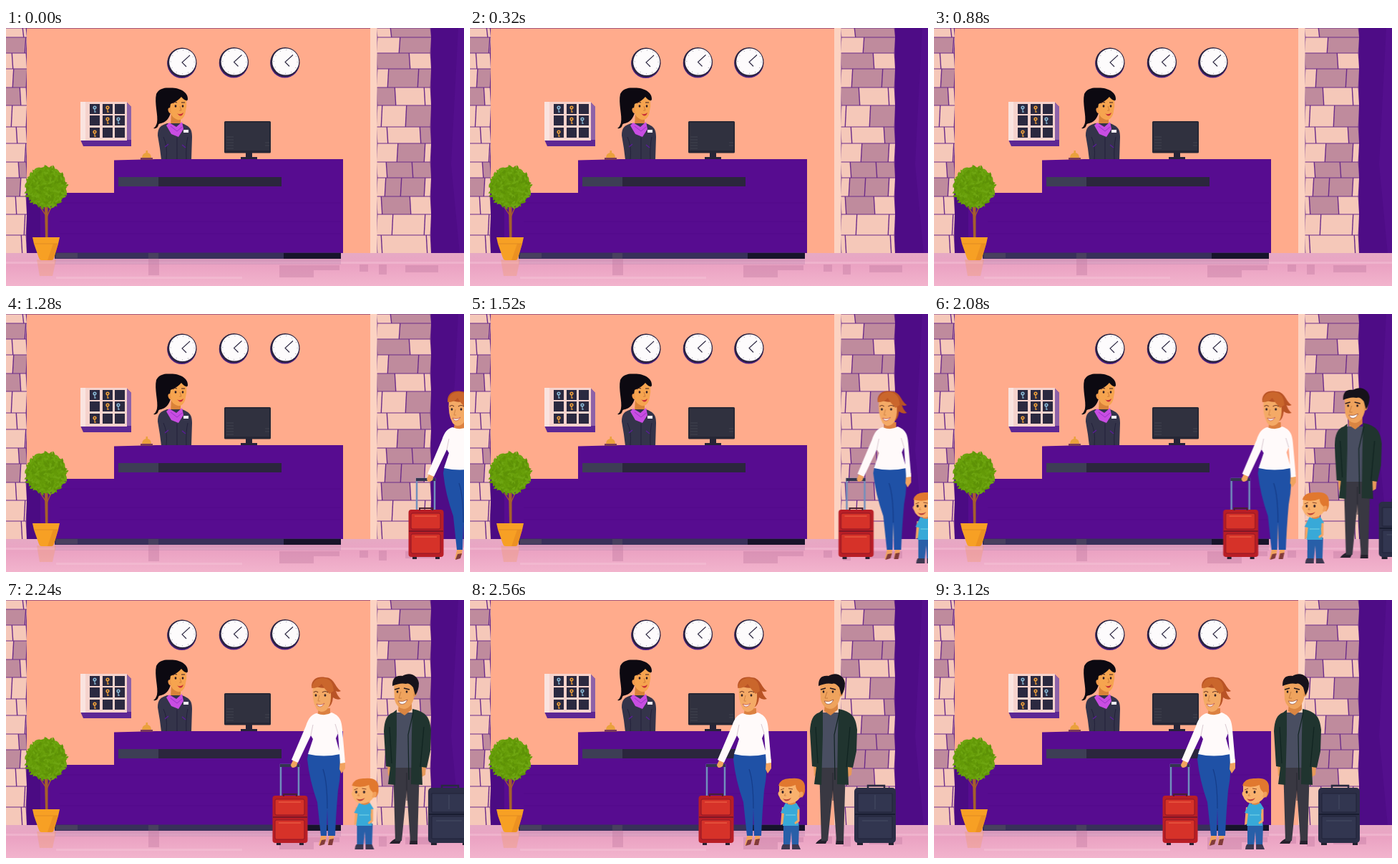
These frames come from a looping animation (640x360 px, 3.2 s). An HTML page:

```html
<!DOCTYPE html>
<html lang="en">
<head>
<meta charset="utf-8">
<title>Hotel reception</title>
<style>
html, body { margin: 0; width: 100%; height: 100%; overflow: hidden; background: #ffab8c; }
svg { display: block; width: 100vw; height: 100vh; }
.guest { animation: arrive 3200ms infinite; }
.child { animation-name: arrive-child; }
/* the guests glide in at twelve and a half pictures per second */
@keyframes arrive {
  0% { transform: translateX(340px); animation-timing-function: step-end; }
  27.5% { transform: translateX(322.2px); animation-timing-function: steps(20, end); }
  77.5% { transform: translateX(5.4px); animation-timing-function: step-end; }
  80%, 100% { transform: none; }
}
@keyframes arrive-child {
  0% { transform: translateX(340px); animation-timing-function: step-end; }
  27.5% { transform: translateX(304px); animation-timing-function: steps(12, end); }
  57.5% { transform: translateX(130.7px); animation-timing-function: steps(8, end); }
  77.5% { transform: translateX(5.4px); animation-timing-function: step-end; }
  80%, 100% { transform: none; }
}
</style>
</head>
<body>
<svg viewBox="0 0 640 360" preserveAspectRatio="none">
  <defs>
    <linearGradient id="floor" x1="0" y1="0" x2="0" y2="1">
      <stop offset="0" stop-color="#e6a9c4"/>
      <stop offset=".4" stop-color="#eba3c3"/>
      <stop offset="1" stop-color="#f2b4cd"/>
    </linearGradient>
    <g id="clock">
      <circle cx="-.3" cy="1.500" r="20.500" fill="#4b1f86"/>
      <circle r="20.500" fill="#2a2340"/>
      <circle cx=".7" cy="-.5" r="18.600" fill="#fdfbfc"/>
      <circle cx=".7" cy="-.5" r="16.500" fill="none" stroke="#8b8792" stroke-width="1.300" stroke-dasharray=".6 8.040"/>
      <path d="M11-10 0 0 6 6" fill="none" stroke="#29243e" stroke-width="1.100"/>
    </g>
    <g id="key">
      <circle r="1.800" cy="-2" fill="none" stroke="currentColor" stroke-width="1.600"/>
      <path d="M0 0V5M0 4H2" stroke="currentColor" stroke-width="1.200"/>
    </g>
  </defs>

  <rect width="640" height="360" fill="#ffab8c"/>
  <path d="M29 0H509V1H29Z" fill="#a85a80"/>
  <rect x="594" width="46" height="315" fill="#4e0c86"/>
  <path d="M640 0V315H634L622 190 632 0Z" fill="#540f8d"/>
  <rect width="29" height="315" fill="#6b2c8a"/>
  <rect x="509" width="85" height="315" fill="#6b2c8a"/>
  <g id="bricks"></g>
  <path d="M509 0H518.500V315H509Z" fill="#fcd3c2"/>

  <use href="#clock" x="246" y="48"/>
  <use href="#clock" x="318.500" y="47.500"/>
  <use href="#clock" x="390" y="47.500"/>

  <!-- key cabinet -->
  <path d="M104 156H169V104L175 110V165H108Z" fill="#5d2794"/>
  <path d="M169 104 175 110V156H169Z" fill="#8d62a8"/>
  <rect x="104" y="103" width="65" height="54" fill="#f6d3cd"/>
  <path d="M104 103H111V157H104Z" fill="#fae3df"/>
  <path id="slots" fill="#2b2940"/>
  <g color="#f2a23b"><use href="#key" x="142" y="113"/><use href="#key" x="142" y="129"/><use href="#key" x="124" y="147"/></g>
  <g color="#8bbbd8"><use href="#key" x="124" y="113"/><use href="#key" x="157" y="129"/></g>

  <!-- receptionist -->
  <path d="M229 83.500C242 83 255 89 254 100C252 103 246 103 243 104L231 113C230 120 228 126 223 130C218 134 215 132 213 135Q212 141 206 140Q210 137 211 132C213 122 207 105 210 92C214 84 222 83 229 83.500Z" fill="#0c0911"/>
  <path d="M231 118H244V134L239 141 230 135Z" fill="#d98239"/>
  <path d="M230 106C237 103 242 100 245 96Q249 101 252 101Q253 109 251 116C250 125 245 129 240 128C233 126 229 120 229 112Z" fill="#f6a44f"/>
  <path d="M230 112C226 109 225 116 229 119L231 119" fill="#f0994b"/>
  <path d="M233 105Q236 102 239 104M245 104 250 104" fill="none" stroke="#391c20" stroke-width="1"/>
  <ellipse cx="237" cy="109" rx="1.400" ry="1.700" fill="#2e1a21"/>
  <ellipse cx="247" cy="109" rx="1.300" ry="1.700" fill="#2e1a21"/>
  <path d="M243 109 245 115 242 115" fill="none" stroke="#cf7c3a" stroke-width="1"/>
  <path d="M239 119Q243 122 248 118Q246 124 242 122Z" fill="#c72d36"/>
  <path d="M225 133C216 136 212 139 212 150L215 168 217 184H259L260 152C260 140 256 137 246 133Z" fill="#34344a"/>
  <path d="M228 132 238 138 246 131 248 141 241 152 231 148 224 136Z" fill="#c84de2"/>
  <path d="M230 137 239 144 246 138" fill="none" stroke="#9a34c4" stroke-width="1"/>
  <path d="M220 152Q226 165 224 183M254 152Q251 165 252 183M239 153V183" fill="none" stroke="#23213a" stroke-width="1"/>
  <path d="M222 166 227 162M246 163 251 167" stroke="#5a1d98" stroke-width="1.500"/>
  <rect x="248" y="142" width="7" height="4" fill="#f5f0f7"/>

  <!-- monitor -->
  <path d="M335 174H344V180H351V183H328V180H335Z" fill="#262437"/>
  <rect x="305" y="130" width="65" height="44.500" rx="1.500" fill="#262735"/>
  <path d="M307 132H368V171H307Z" fill="#30313f"/>
  <path d="M308 152H318M308 156H318M308 160H318M308 164H318M308 168H318M362 160H368M362 164H368" stroke="#41424f" stroke-width="1"/>

  <!-- floor and counter -->
  <rect y="314" width="640" height="46" fill="url(#floor)"/>
  <path d="M0 326H640V329H0ZM70 347H330V350H70Z" fill="#f7ccdc" opacity=".35"/>
  <path d="M68 322H468V330H68Z" fill="#bf86b0" opacity=".4"/>
  <path d="M199 322H214V345H199ZM382 331H430V348H382ZM430 331H466V338H430ZM494 330H506V340H494ZM521 330H532V344H521ZM558 331H604V341H558Z" fill="#b9749c" opacity=".35"/>
  <path d="M43 323H70L65 346H47Z" fill="#f09a6a" opacity=".35"/>
  <path d="M29 230H151V184.500L210 183H471V314H29Z" fill="#570c90"/>
  <path d="M29 230H48V314H29Z" fill="#4b0b83"/>
  <path d="M75 244H468M75 270H468M75 287H468" stroke="#520a8a" stroke-width=".8"/>
  <path d="M68 313.500H468V322H68Z" fill="#38305a"/>
  <path d="M70 314H100V321H70ZM199 314H213V322H199Z" fill="#48405f"/>
  <path d="M388 314H468V322H388Z" fill="#17142b"/>
  <path d="M157 208H385V221H157Z" fill="#2b263d"/>
  <path d="M157 208H213V221H157Z" fill="#3d3e55"/>
  <path d="M190 182Q190 175 195.500 174V171H198V174Q203 175 203 182Z" fill="#eaa13d"/>
  <path d="M188 181H205V184H188Z" fill="#7b3a59"/>

  <!-- plant -->
  <path d="M54 250 55 293H58.500V250Z" fill="#a5602b"/>
  <path d="M56 266 63 250M56 262 48 250" stroke="#a5602b" stroke-width="1.300"/>
  <g id="leaves"></g>
  <path d="M37 292H75L73 301 67 321Q66 324 63 324H50Q47 324 46 321L39 301Z" fill="#f7a024"/>
  <path d="M66 301H73L67 321Q66 324 63 324H58Z" fill="#e5871f" opacity=".6"/>
  <path d="M39 301H73" stroke="#e08a22" stroke-width="1"/>

  <!-- woman with red case -->
  <g class="guest">
    <path d="M331 273V230H356V273" fill="none" stroke="#718fbd" stroke-width="2.500"/>
    <path d="M330 229H357V233H330Z" fill="#33364f"/>
    <path d="M325 337H331V342H325ZM357 337H363V342H357Z" fill="#272132"/>
    <rect x="319.500" y="273" width="49" height="66" rx="4" fill="#b91e26"/>
    <path d="M335 274V271H353V274" fill="none" stroke="#4b2030" stroke-width="2"/>
    <rect x="323" y="278" width="41" height="22" rx="2" fill="#d63229" stroke="#8e1725"/>
    <rect x="323" y="307" width="41" height="27" rx="2" fill="#d63229" stroke="#8e1725"/>
    <path d="M320 303H368" stroke="#7f1726" stroke-width="2"/>
    <path d="M328 282H359M328 311H359" stroke="#f26a4b" stroke-width="1.200"/>

    <path d="M384 151H400V164H382Z" fill="#dc8141"/>
    <path d="M388 325H395L394 336 388 342H384Q386 335 388 325ZM399 324H406L405 333 402 342H397Z" fill="#f1a35f"/>
    <path d="M388 335 394 334 392 341 385 343ZM399 334 405 333 403 342H397Z" fill="#823b3a"/>
    <path d="M370 210H413Q417 234 411 266Q408 300 407 329H397L396 291 395 329H387L382 282Q371 251 368 222Z" fill="#1f51a6"/>
    <path d="M390 236Q396 253 396 291" fill="none" stroke="#163d89" stroke-width="1.200"/>
    <path d="M349 222 355 225 353 232Q346 237 345 230ZM414 223 421 222V235L416 242 413 236Z" fill="#f1a35f"/>
    <path d="M381 158C374 160 370 164 366 176L346 223 355 227 373 189 376 194 369 215Q391 220 414 215L408 193 411 186 414 228 421 227 417 181C416 166 412 161 402 157Q393 163 381 158Z" fill="#fffafa"/>
    <path d="M373 189 376 174M411 186 407 173" fill="none" stroke="#d9c8d0" stroke-width="1"/>
    <path d="M374 121C374 110 383 106 393 108C406 108 406 121 415 127Q411 129 408 127Q410 134 415 138Q409 140 404 136Q403 147 397 150L397 134Z" fill="#b95325"/>
    <path d="M376 119Q391 126 400 120Q404 146 394 154Q387 159 381 152Q374 140 376 119Z" fill="#f4aa66"/>
    <path d="M374 123Q377 107 393 109Q404 111 405 127L399 131Q392 124 388 117Q384 123 374 123Z" fill="#ca662c"/>
    <path d="M377 129Q380 126 383 129M389 129Q393 126 397 129" fill="none" stroke="#693423" stroke-width="1.100"/>
    <ellipse cx="380" cy="133" rx="1.400" ry="1.800" fill="#312127"/>
    <ellipse cx="393" cy="133" rx="1.400" ry="1.800" fill="#312127"/>
    <path d="M385 133 383 141H386" fill="none" stroke="#d18446" stroke-width="1"/>
    <path d="M381 145Q387 148 392 144Q388 151 383 148Z" fill="#fff" stroke="#b8423f" stroke-width=".7"/>
  </g>

  <!-- man with dark case -->
  <g class="guest">
    <path d="M556 263V259H579V263" fill="none" stroke="#292b40" stroke-width="2.500"/>
    <path d="M541 337H549V342H541ZM585 337H592V342H585Z" fill="#22212f"/>
    <rect x="537" y="262" width="58" height="77" rx="5" fill="#2b2e46"/>
    <path d="M542 270H590V296H542ZM542 302H590V333H542Z" fill="#323650" stroke="#202338"/>
    <path d="M538 299H594" stroke="#191d31" stroke-width="1.800"/>
    <path d="M566 272V292M548 308H584" stroke="#464c65"/>

    <path d="M493 332 500 334 497 340H483Q485 336 493 332ZM512 332 522 334V341H511Z" fill="#26212d"/>
    <path d="M488 232H525L522 336H512L507 265 500 336H491Z" fill="#393842"/>
    <path d="M507 241V280" stroke="#282630"/>
    <path d="M480 230H486L485 242 481 246ZM527 232H534L533 244 528 247Z" fill="#e79a59"/>
    <path d="M488 157H520V234H488Z" fill="#494e61"/>
    <path d="M493 153 488 157C479 160 476 168 475 183L478 232 484 233 481 257 491 258 493 187ZM515 152C533 156 539 162 541 181L540 211 535 234 528 233 529 258 513 257 514 188Z" fill="#20342f"/>
    <path d="M483 177 486 228M531 177 526 233M516 157 509 188 510 251" fill="none" stroke="#112421" stroke-width="1.200"/>
    <path d="M496 143H514V153L504 161 495 155Z" fill="#d98542"/>
    <path d="M489 115H517L518 133Q514 152 503 152Q493 151 490 139Z" fill="#efa35d"/>
    <path d="M517 125Q523 122 521 131Q520 136 516 134Z" fill="#e39450"/>
    <path d="M487 120C487 110 490 105 501 106C512 99 523 106 524 116Q524 126 519 133L516 122Q510 115 506 117Q498 115 487 120Z" fill="#16121a"/>
    <path d="M490 125 497 123M503 123 511 125" stroke="#281b20" stroke-width="1.500"/>
    <ellipse cx="494" cy="128" rx="1.300" ry="1.700" fill="#281b20"/>
    <ellipse cx="507" cy="128" rx="1.300" ry="1.700" fill="#281b20"/>
    <path d="M499 128 496 137H500" fill="none" stroke="#c47b3f" stroke-width="1"/>
    <path d="M495 141Q502 143 508 139Q505 147 498 145Z" fill="#fff" stroke="#914330" stroke-width=".7"/>
  </g>

  <!-- boy -->
  <g class="guest child">
    <path d="M438 312H460L459 343H450L449 323 447 343H438Z" fill="#285fa8"/>
    <path d="M437 341H447V348H435Q435 344 437 341ZM450 341H459L462 348H450Z" fill="#3e3851"/>
    <path d="M436 289 441 290 439 312 434 314ZM456 290 460 292 459 313 454 314Z" fill="#f3a664"/>
    <path d="M444 278H455V287H444Z" fill="#dc8746"/>
    <path d="M441 283Q449 289 456 283L461 291 457 299 459 315H437L439 298 434 297Z" fill="#38a9d8"/>
    <path d="M441 300H455" stroke="#6fd0e6" stroke-width="1.200"/>
    <path d="M459 293V308L455 311" fill="none" stroke="#f3a664" stroke-width="3" stroke-linecap="round"/>
    <path d="M432 259Q435 252 449 253Q463 254 465 267Q461 282 447 284Q435 284 432 274Q429 270 432 267Z" fill="#f9b16d"/>
    <path d="M431 259Q434 248 449 249Q469 247 468 263Q469 270 464 276L460 268Q455 264 455 258Q444 263 431 259Z" fill="#e1782f"/>
    <path d="M461 268Q467 266 465 273Q463 277 459 275Z" fill="#f2a05b"/>
    <path d="M434 265 439 263M445 263 451 264" stroke="#8b4728" stroke-width="1"/>
    <ellipse cx="437" cy="268" rx="1.500" ry="1.900" fill="#322128"/>
    <ellipse cx="448" cy="268" rx="1.500" ry="1.900" fill="#322128"/>
    <path d="M441 270 439 273H442" fill="none" stroke="#d18446" stroke-width="1"/>
    <path d="M437 277Q443 280 449 276Q445 282 440 280Z" fill="#bb453a"/>
  </g>
</svg>
<script>
const byId = id => document.getElementById(id);

function add(parent, tag, attrs) {
  const node = document.createElementNS("http://www.w3.org/2000/svg", tag);
  for (const name in attrs) node.setAttribute(name, attrs[name]);
  parent.append(node);
}

// Each course holds its joints; letters give dark or light stone.
const courses = [0, 13, 35, 57, 83, 108, 138, 161, 187, 209, 235, 260, 289, 315];
const joints = [[538], [550], [564], [534, 576], [544, 585], [525, 559], [533, 579],
  [547, 585], [532, 568], [530, 552, 585], [525, 565], [540, 585], [525, 588]];
const rightStone = "ld ld dl ldd dll lld lld ldl ldd lddl ldl lll lll".split(" ");
const leftJoints = [24, 27, 9, 10, 20, 8, 15, 27, 18, 20, 14, 26, 22];
const leftStone = "ll dl ll ld dl ll ll ll ld dl ll ll ll".split(" ");
const stone = { d: "#bf8b9d", l: "#f5c8b9" };

function layCourse(row, start, end, splits, kinds) {
  const edges = [start, ...splits, end];
  const top = courses[row] + .6, bottom = courses[row + 1] - .6;
  const lean = row % 2 ? .7 : -.7;
  [...kinds].forEach((kind, i) => {
    const left = edges[i] + .7, right = edges[i + 1] - .7;
    add(byId("bricks"), "path", {
      d: `M${left + lean} ${top}H${right + lean}L${right - lean} ${bottom}H${left - lean}Z`,
      fill: stone[kind]
    });
  });
}

for (let row = 0; row < 13; row++) {
  layCourse(row, -2, 29, [leftJoints[row]], leftStone[row]);
  layCourse(row, 518, 594, joints[row], rightStone[row]);
}

let slots = "";
for (const y of [106, 122, 139]) for (const x of [117, 135, 152]) slots += `M${x} ${y}h14v14h-14Z`;
byId("slots").setAttribute("d", slots);

let seed = 17;
const random = () => (seed = seed * 16807 % 2147483647) / 2147483647;
const leaves = byId("leaves");
add(leaves, "circle", { cx: 56, cy: 222, r: 28, fill: "#5f9408" });
for (let i = 0; i < 190; i++) {
  const angle = i * 2.39996, reach = Math.sqrt((i + .5) / 190) * 28.5;
  const x = 56 + Math.cos(angle) * reach, y = 222 + Math.sin(angle) * reach;
  add(leaves, "path", {
    d: "M-4.500 0Q0-3.500 4.500 0Q0 3.500-4.500 0Z",
    fill: ["#649a08", "#69a00b", "#5e9207", "#6ea511"][Math.floor(random() * 4)],
    transform: `translate(${x} ${y}) rotate(${random() * 180})`
  });
}
</script>
</body>
</html>
```
